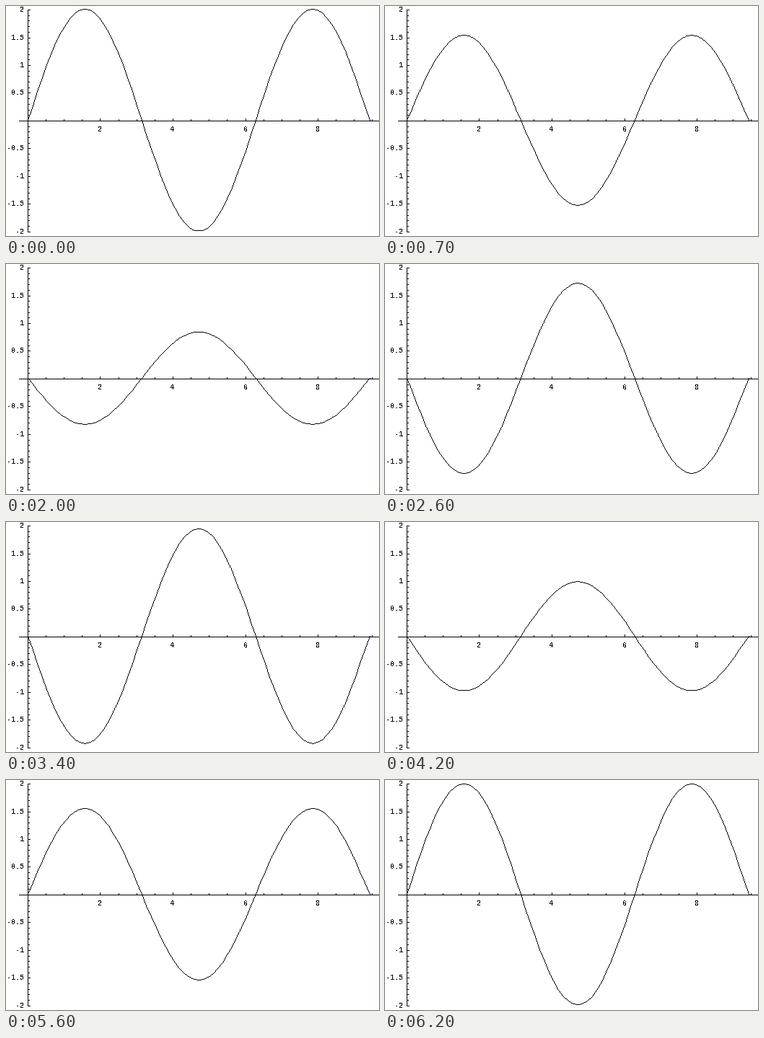
Recreate the animation shown at these times as a matplotlib script. Size 517 by 319 pixels, loop 6300 ms.

```python
import numpy as np
import matplotlib.pyplot as plt
from matplotlib.animation import FuncAnimation

W, H, DPI = 517, 319, 100
PX = 72 / DPI                 # one pixel in points
X0, Y0 = 30, 158.93           # centre of the axes
SX, SY = 50.25, 76.95         # pixels per unit
FRAMES, STEP = 63, 100

plt.rcParams.update({
    "font.family": "Liberation Mono",
    "font.size": 10 * PX,
    "text.antialiased": False,
    "text.hinting": "native",
    "text.hinting_factor": 1,
})

fig = plt.figure(figsize=(W / DPI, H / DPI), dpi=DPI, facecolor="white")
ax = fig.add_axes([0, 0, 1, 1])
ax.set_xlim(0, W)
ax.set_ylim(H, 0)
ax.axis("off")


def col(x):
    return np.rint(X0 + SX * x).astype(int)


def row(y):
    return np.rint(Y0 - SY * y).astype(int)


# Lines go through pixel centres unsnapped, so each covers whole pixels.
LINE = dict(colors="black", lw=PX, antialiased=False, snap=False)


def hline(r, left, right):
    ax.hlines(r + 0.5, left, right, **LINE)


def vline(c, top, bottom):
    ax.vlines(c + 0.5, top, bottom, **LINE)


def draw_axes():
    axis_row, axis_col = row(0), col(0)
    hline(axis_row, 18, W)
    vline(axis_col, row(2), row(-2) + 1)
    for k in range(1, 20):
        major = k % 4 == 0
        c = col(k / 2)
        vline(c, axis_row - (3 if major else 2), axis_row)
        if major:
            ax.text(c, axis_row + 15, f"{k // 2}", ha="center", va="baseline")
    for k in range(-20, 21):
        major = k % 5 == 0
        r = row(k / 10)
        hline(r, axis_col, axis_col + (4 if major else 3))
        if major and k:
            ax.text(25, r + 3, f"{k / 10:g}", ha="right", va="baseline")


def trace(px, py):
    """Pixels along a polyline, one per step of its longer direction."""
    xs, ys = [], []
    for xa, ya, xb, yb in zip(px[:-1], py[:-1], px[1:], py[1:]):
        n = max(1, abs(xb - xa), abs(yb - ya))
        s = np.arange(n + 1) / n
        xs.append(np.rint(xa + (xb - xa) * s))
        ys.append(np.rint(ya + (yb - ya) * s))
    return np.concatenate(xs), np.concatenate(ys)


theta = np.linspace(0, 3 * np.pi, 73)
draw_axes()
curve, = ax.plot([], [], ",", color="black")


def update(i):
    y = 2 * np.sin(theta) * np.cos(i / 10)
    rows = np.minimum(row(y), row(-2) - 1)
    curve.set_data(*trace(col(theta), rows))
    return curve,


anim = FuncAnimation(fig, update, frames=FRAMES, interval=STEP,
                     repeat=True, repeat_delay=0, blit=False)
plt.show()
```
